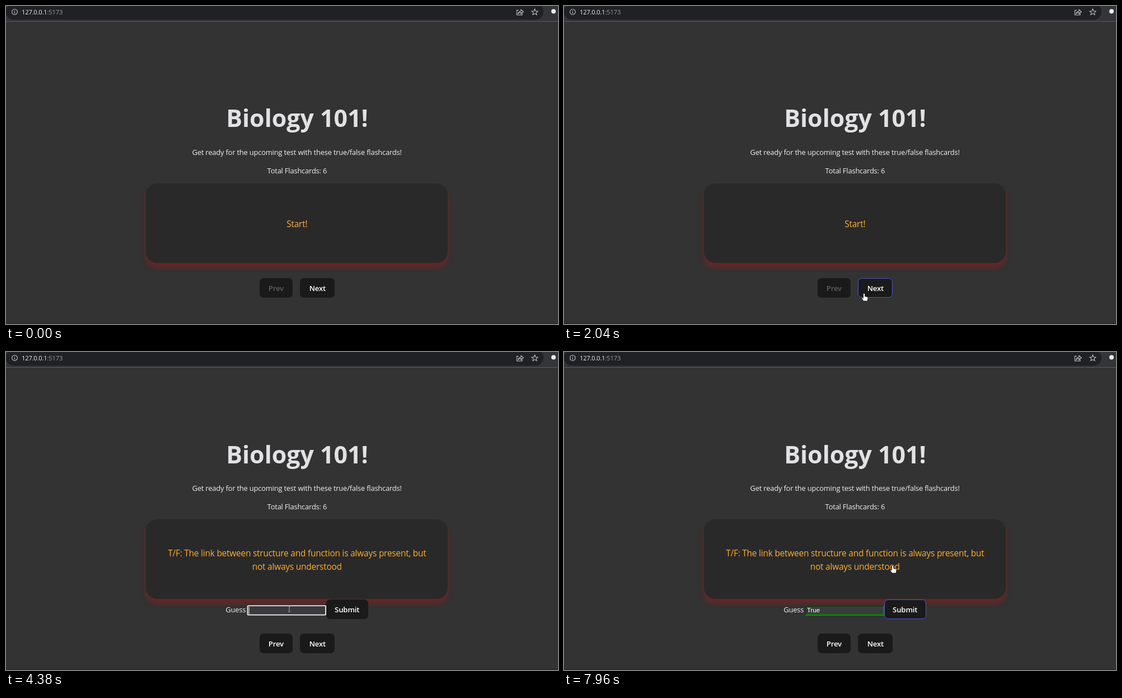
Recreate the animation shown at these times as an HTML page. Size 986x568 px, loop 8 s.

```html
<!DOCTYPE html>
<html lang="en">
<head>
<meta charset="utf-8">
<title>Flashcards</title>
<style>
  html, body { margin: 0; width: 100%; height: 100%; overflow: hidden; background: #333; }
  svg { display: block; width: 100%; height: 100%; }
  text { font: 12.9px "Open Sans", "Noto Sans", sans-serif; letter-spacing: -.014em; fill: #f0f0f0; }
  .mid { text-anchor: middle; }
  #title { font-size: 42.9px; font-weight: 700; letter-spacing: 0; fill: #e2e1e3; }
  .card text { font-size: 15.43px; fill: #ffae2f; }
  .button text { font-size: 13.2px; font-weight: 600; fill: #fff; }
  .button rect { fill: #1a1a1a; }
  .button .edge { fill: none; stroke: #646cff; opacity: 0; }
  .url { font-size: 11.1px; }
  .url .port { fill: #9aa0a6; }
  #typed { font: 11.5px "Liberation Sans", Arial, sans-serif; letter-spacing: 0; fill: #fff; }
  .icon { fill: none; stroke: #c4c7cb; stroke-width: 1.1; }
  .solid { fill: #fff; stroke: #1c1c1c; stroke-width: .9; stroke-linejoin: round; }
</style>
</head>
<body>
<svg viewBox="0 0 986 568" preserveAspectRatio="none">
  <defs>
    <filter id="blur" x="-10%" y="-30%" width="120%" height="160%"><feGaussianBlur stdDeviation="5"/></filter>
  </defs>

  <rect width="986" height="568" fill="#333"/>
  <rect width="986" height="27" fill="#343538"/>
  <rect x="0" y="-4" width="960" height="28.5" rx="14" fill="#202124"/>
  <rect y="27" width="986" height="1" fill="#5c5c5c"/>
  <rect y="566" width="986" height="2" fill="#2a2a2a"/>
  <g class="icon">
    <circle cx="15.5" cy="10.5" r="4.8"/>
    <path d="M15.5 10V13.2M15.5 7.7V8.9"/>
    <path d="M916 7.5H912.5V16H922V13.5M915 13.5Q915.5 9.5 920 9.3V6.5L924.3 10.3 920 13.8V11.5Q917 11.4 915 13.5Z"/>
    <path d="M944.5 5.3L946 9 950 9.3 947 11.9 948 15.7 944.5 13.6 941 15.7 942 11.9 939 9.3 943 9Z"/>
  </g>
  <circle cx="978" cy="9.5" r="4" fill="#eee"/>
  <text class="url" x="28" y="14.5">127.0.0.1<tspan class="port">:5173</tspan></text>

  <text id="title" class="mid" x="520" y="216">Biology 101!</text>
  <g id="head">
    <text class="mid" x="519.7" y="265.5">Get ready for the upcoming test with these true/false flashcards!</text>
    <text class="mid" x="519.9" y="298.5">Total Flashcards: 6</text>
    <rect x="250" y="325" width="539" height="142" rx="20" fill="#861c1c" opacity=".66" filter="url(#blur)"/>
    <rect x="250" y="317" width="539" height="142" rx="20" fill="#292929"/>
  </g>

  <g class="card mid">
    <text id="start" x="519.8" y="395">Start!</text>
    <text id="hint" x="519.8" y="395">Click the next button to start with the flashcards</text>
    <g id="question">
      <text x="519.8" y="365">T/F: The link between structure and function is always present, but</text>
      <text x="519.8" y="389">not always understood</text>
    </g>
  </g>

  <g id="form">
    <text x="392.3" y="465">Guess</text>
    <rect id="field" x="431.5" y="453.5" width="140" height="16.5" fill="#3b3b3b" stroke="#858585"/>
    <rect id="ring" x="431.5" y="453.3" width="139.5" height="16.2" rx="1.5" fill="#3b3b3e" stroke="#fff" stroke-width="1.6"/>
    <g id="correct" fill="none" stroke-width="1.8">
      <rect x="431" y="453" width="140.5" height="17" fill="#3b3b3b"/>
      <path d="M432 470V453.9H571" stroke="#0b3f0b"/>
      <path d="M432 469.2H570.8V454" stroke="#058005"/>
    </g>
    <text id="typed" x="434" y="465"></text>
    <rect id="caret" y="455" width="1" height="13" fill="#fff"/>
    <g class="button" id="submit">
      <rect x="572" y="442" width="75" height="35" rx="7"/>
      <rect class="edge" x="572.5" y="442.5" width="74" height="34" rx="6.5"/>
      <text class="mid" x="609.2" y="465">Submit</text>
    </g>
  </g>

  <g id="nav">
    <g class="button">
      <rect x="453" y="486" width="59" height="35" rx="7"/>
      <text id="prev" class="mid" x="482.4" y="509">Prev</text>
    </g>
    <g class="button" id="next">
      <rect x="525" y="486" width="62" height="35" rx="7"/>
      <rect class="edge" x="525.5" y="486.5" width="61" height="34" rx="6.5"/>
      <text class="mid" x="556.4" y="509">Next</text>
    </g>
  </g>

  <circle id="pulse" fill="#ff0"/>
  <g id="pointer">
    <path id="arrow" class="solid" d="M0 0V13.5L3.2 10.5 5.3 15 7.3 14 5.2 9.8 9.5 9.7Z"/>
    <path id="hand" class="solid" d="M-1.5 1Q0 -1 1.5 1V5.5L5.5 6.6Q7.2 7.2 7 9.3L6 14H-1L-4 9.6Q-4.6 8 -3.2 7.8L-1.5 9Z"/>
    <path id="beam" d="M-2 -5H2M-2 5H2M0 -5V5" fill="none" stroke="#a9a9a9"/>
  </g>
</svg>
<script>
const LOOP = 8000;
const $ = id => document.getElementById(id);
const show = (id, on) => { $(id).style.display = on ? '' : 'none'; };
const clamp = v => Math.max(0, Math.min(1, v));
const within = (t, a, b) => t >= a && t < b;

// time, x, y, shape in use from that time on
const path = [
  [190, 938, 560, 'arrow'], [400, 860, 490, 'arrow'], [560, 755, 440, 'hand'], [740, 650, 405, 'hand'],
  [920, 600, 392, 'hand'], [1310, 600, 392, 'hand'], [1450, 601, 404, 'hand'], [1660, 592, 446, 'hand'],
  [1750, 575, 474, 'arrow'], [1820, 556, 500, 'hand'], [1960, 539, 518, 'hand'], [2040, 536, 513, 'hand'],
  [2840, 536, 513, 'hand'], [2980, 536, 520, 'hand'], [3200, 536, 520, 'hand'], [3270, 572, 430, 'hand'],
  [3350, 602, 347, 'hand'], [3610, 602, 346, 'hand'], [3920, 602, 346, 'hand'], [3990, 612, 415, 'hand'],
  [4060, 620, 475, 'hand'], [4130, 600, 509, 'arrow'], [4200, 550, 485, 'arrow'], [4270, 506, 459, 'beam'],
  [6590, 506, 459, 'beam'], [6660, 514, 474, 'arrow'], [6800, 545, 508, 'arrow'], [6940, 585, 485, 'arrow'],
  [7010, 596, 468, 'hand'], [7150, 590, 462, 'hand'], [7860, 590, 462, 'hand'], [7960, 587, 381, 'hand']
];

// press, release, gone, x, y
const clicks = [
  [1010, 1250, 1380, 600, 392], [2050, 2200, 2390, 536, 513],
  [4270, 4310, 4380, 506, 459], [7220, 7290, 7480, 590, 462]
];

const typing = [[5650, 'T'], [5850, 'Tr'], [6010, 'Tru'], [6260, 'True']];

function drawPointer(t) {
  show('pointer', t >= 190);
  if (t < 190) return;
  const i = path.findLastIndex(p => p[0] <= t);
  const [t0, x0, y0, shape] = path[i];
  const [t1, x1, y1] = path[i + 1] || [t0 + 1, x0, y0];
  const k = clamp((t - t0) / (t1 - t0));
  $('pointer').setAttribute('transform', `translate(${x0 + (x1 - x0) * k} ${y0 + (y1 - y0) * k})`);
  for (const id of ['arrow', 'hand', 'beam']) show(id, id === shape);
}

function drawPulse(t) {
  const click = clicks.find(c => within(t, c[0], c[2]));
  show('pulse', click);
  if (!click) return;
  const [, release, gone, x, y] = click;
  const k = clamp((t - release) / (gone - release));
  const attrs = { cx: x, cy: y, r: 10 + 6 * k, opacity: .5 * (1 - k) };
  for (const name in attrs) $('pulse').setAttribute(name, attrs[name]);
}

function drawField(t) {
  const focused = within(t, 4310, 7220);
  const step = typing.findLast(s => s[0] <= t);
  const lastKey = step ? step[0] : 4320;
  show('ring', focused);
  show('correct', t >= 7290);
  $('typed').textContent = step ? step[1] : '';
  show('caret', focused && Math.floor(Math.max(0, t - lastKey) / 530) % 2 === 0);
  $('caret').setAttribute('x', step ? 434 + $('typed').getComputedTextLength() : 433.5);
}

function edge(id, opacity) {
  document.querySelector(`#${id} .edge`).style.opacity = opacity;
}

function render(t) {
  const asking = t >= 2120;
  const hinting = within(t, 1010, 1380);
  const shift = (id, y) => $(id).setAttribute('transform', `translate(0 ${asking ? y : 0})`);
  shift('title', -17.4);
  shift('head', -18);
  shift('nav', 17);
  show('start', !asking && !hinting);
  show('hint', hinting);
  show('question', asking);
  show('form', asking);
  $('start').style.fill = t < 1010 ? '#ffb14c' : '';
  $('prev').style.fill = asking ? '' : '#5e5e5e';
  edge('next', .85 * clamp((t - 1820) / 250) * (1 - clamp((t - 3200) / 250)));
  edge('submit', .75 * clamp((t - 7010) / 250));
  drawField(t);
  drawPulse(t);
  drawPointer(t);
}

const began = performance.now();
function frame() {
  render((performance.now() - began) % LOOP);
  requestAnimationFrame(frame);
}
frame();
</script>
</body>
</html>
```
